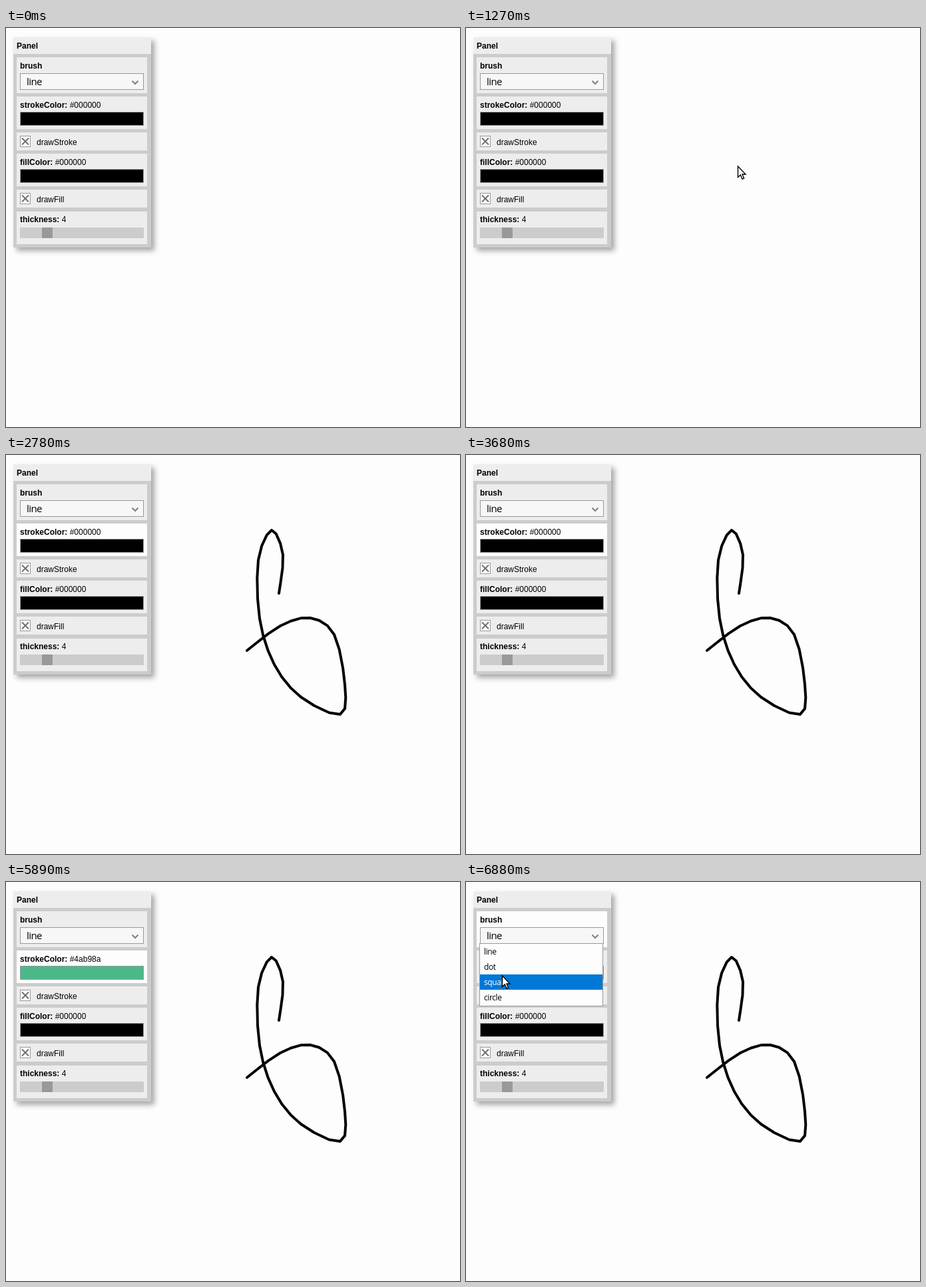
Write an HTML page that moves like this. It is 682 px wide and 600 px high and loops after 7080 ms.

```html
<!DOCTYPE html>
<html lang="en">
<head>
<meta charset="utf-8">
<title>Brush panel</title>
<style>
html, body { margin: 0; width: 100%; height: 100%; overflow: hidden; background: #fdfdfd; }
#shadow { position: absolute; left: 11px; top: 14px; width: 207px; height: 316px; box-shadow: 5px 5px 8px rgba(0, 0, 0, .35); }
svg { position: absolute; left: 0; top: 0; }
text { font: 12px "Liberation Sans", Arial, sans-serif; white-space: pre; }
.b { font-weight: bold; }
.ui { font: 15px "Open Sans", "Noto Sans", sans-serif; letter-spacing: -.6px; }
#menu .ui { font-size: 12px; letter-spacing: -.4px; }
</style>
</head>
<body>
<div id="shadow"></div>
<svg width="682" height="600" viewBox="0 0 682 600">
  <g id="panel"></g>
  <path id="ink" fill="none" stroke="#000" stroke-width="4" stroke-linecap="round" stroke-linejoin="round"/>
  <g id="menu"></g>
  <path id="cursor" d="M.5 0V16.5L4.3 13 7 19 9.6 18 7 12H12Z" fill="#fff" stroke="#000" stroke-width="1.4"/>
</svg>
<script>
const LOOP = 7080, ROW = '#ededed', LIT = '#fdfdfd', BODY = '#ccc', EDGE = '#999';
const $ = id => document.getElementById(id);

const rect = (x, y, w, h, fill, extra = '') =>
  `<rect x="${x}" y="${y}" width="${w}" height="${h}" fill="${fill}" ${extra}/>`;
const box = (x, y, w, h, fill, extra = '') =>
  rect(x + .5, y + .5, w - 1, h - 1, fill, `stroke="${EDGE}" ${extra}`);
const text = (x, y, s, cls = '') => `<text x="${x}" y="${y}" class="${cls}">${s}</text>`;
const value = (y, label, s, id = '') =>
  `<text x="21" y="${y}"><tspan class="b">${label}:</tspan> <tspan id="${id}">${s}</tspan></text>`;
const row = (y, h, id = '') => rect(16, y, 196, h, ROW, `id="${id}"`);
const swatch = (y, id) => row(y, 49, id + 'Row') +
  value(y + 17, id + 'Color', '#000000', id + 'Hex') + box(21, y + 23, 186, 21, '#000', `id="${id}"`);
const check = (y, label) => row(y, 27) + box(21, y + 5, 16, 17, LIT) +
  `<path d="M24 ${y + 8.5}l10 10m0-10l-10 10" stroke="#707070" stroke-width="2"/>` +
  text(46, y + 19, label);

$('panel').innerHTML =
  rect(11, 14, 207, 316, BODY) + rect(11, 14, 207, 25, ROW) + text(16, 31, 'Panel', 'b') +
  row(44, 54, 'brushRow') + text(21, 61, 'brush', 'b') +
  box(21, 68, 186, 25, '#f7f7f7') + text(31, 86, 'line', 'ui') +
  '<path d="M189.5 79.5l4.5 4.5 4.5-4.5" fill="none" stroke="#808080" stroke-width="2"/>' +
  swatch(103, 'stroke') + check(157, 'drawStroke') +
  swatch(189, 'fill') + check(243, 'drawFill') +
  row(276, 49) + value(292, 'thickness', 4) +
  rect(21, 300, 186, 16, BODY) + rect(54, 300, 16, 16, EDGE);

const items = ['line', 'dot', 'square', 'circle'];
$('menu').innerHTML = box(20, 92, 186, 95, LIT) + rect(21, 93, 184, 23, '#0078d7', 'id="hover"') +
  items.map((s, i) => text(27, 109 + 23 * i, s, 'ui')).join('');
const labels = $('menu').querySelectorAll('text');

// The drawn loop is a Catmull-Rom curve through a few points, sampled once per mouse event
const keys = [[410,208],[416,150],[399,113],[379,158],[381,246],[403,315],[443,364],
  [502,390],[509,345],[493,270],[457,245],[412,257],[362,294]];
const PER_KEY = 3, LAST = (keys.length - 1) * PER_KEY;
const key = i => keys[Math.max(0, Math.min(keys.length - 1, i))];

function curve(k) {
  const i = Math.floor(k / PER_KEY), u = k / PER_KEY - i;
  return [0, 1].map(c => {
    const [a, b, d, e] = [-1, 0, 1, 2].map(j => key(i + j)[c]);
    return b + u * ((d - a) / 2 + u * (a - 2.5 * b + 2 * d - e / 2 + u * (1.5 * (b - d) + (e - a) / 2)));
  });
}
const line = Array.from({ length: LAST + 1 }, (_, k) => curve(k));

// The ink trails the pointer by the event lag
const DRAW = 1340, STEP = 1000 / 60, LAG = 42;
const press = DRAW - LAG, release = press + LAST * STEP;

function glide([x0, y0], [x1, y1], t0, t1, t) {
  const u = Math.max(0, Math.min(1, (t - t0) / (t1 - t0))), s = u * u * (3 - 2 * u);
  return [x0 + (x1 - x0) * s, y0 + (y1 - y0) * s];
}

const rest = [157, 146], select = [60, 82], square = [54, 141];
function pointer(t) {
  if (t >= 6500) return glide(select, square, 6520, 6840, t);
  if (t >= 6230) return glide([140, 90], select, 6230, 6420, t);
  if (t < 330 || t >= 2740) return null;
  if (t < 720) return glide([672, 580], rest, 330, 690, t);
  if (t < press) return glide(rest, keys[0], 760, press, t);
  if (t < release) return curve((t - press) / STEP);
  return glide(key(LAST), [118, 136], 2150, 2560, t);
}

const show = (id, on) => $(id).setAttribute('visibility', on ? 'visible' : 'hidden');
const paint = (id, color) => $(id).setAttribute('fill', color);

function draw(t) {
  const at = pointer(t), open = t >= 6500, color = t >= 5080 ? '#4ab98a' : '#000000';
  show('cursor', at);
  if (at) $('cursor').setAttribute('transform', `translate(${at.map(Math.round)})`);

  const count = Math.max(0, Math.floor((t - DRAW) / STEP) + 1);
  $('ink').setAttribute('d', count > 1 ? 'M' + line.slice(0, count).join('L') : '');

  paint('stroke', color);
  $('strokeHex').textContent = color;
  paint('strokeRow', t >= 2660 && !open ? LIT : ROW);
  paint('brushRow', open ? LIT : ROW);

  show('menu', open);
  if (open) {
    const hit = Math.max(0, Math.min(3, Math.floor((at[1] - 93) / 23)));
    $('hover').setAttribute('y', 93 + 23 * hit);
    labels.forEach((el, i) => el.setAttribute('fill', i === hit ? '#fff' : '#000'));
  }
}

const start = performance.now();
function frame() {
  draw((performance.now() - start) % LOOP);
  requestAnimationFrame(frame);
}
frame();
</script>
</body>
</html>
```
